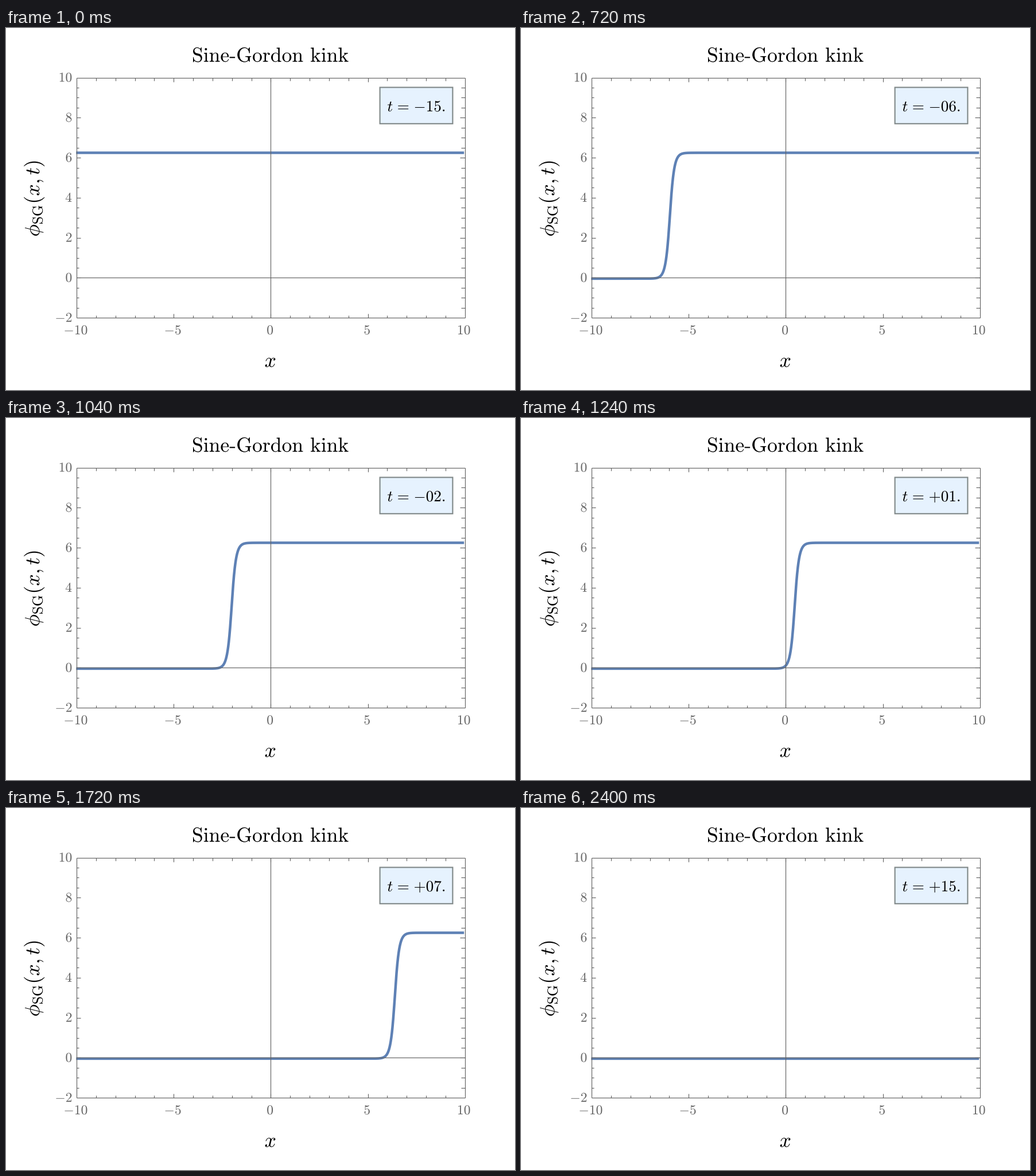
These frames come from a looping animation (887x631 px, 2.44 s). A matplotlib script:

```python
import math

import matplotlib.pyplot as plt
import numpy as np
from matplotlib.animation import FuncAnimation
from matplotlib.collections import LineCollection
from matplotlib.patches import PathPatch, Rectangle
from matplotlib.textpath import TextPath
from matplotlib.transforms import Affine2D

plt.rcParams["mathtext.fontset"] = "cm"

W, H, DPI = 887, 631, 64
PT = 72 / DPI  # points per pixel
STEPS, INTERVAL = 61, 40
SPEED = 0.99
GAMMA = 1 / math.sqrt(1 - SPEED**2)

GREY = "#666666"
BLUE = "#5e81b5"

fig = plt.figure(figsize=(W / DPI, H / DPI), dpi=DPI, facecolor="white")
ax = fig.add_axes([0, 0, 1, 1])
ax.set_xlim(0, W)
ax.set_ylim(H, 0)
ax.axis("off")


def grid_x(v):
    return 461.4 + 33.82 * v


def grid_y(v):
    return 435.4 - 34.89 * v


def text_path(s, size, x, y, anchor=None, angle=0):
    """Outline of math text; x is the pen origin, or an edge of the ink."""
    path = TextPath((0, 0), f"${s}$", size=size)
    if anchor:
        box = path.get_extents()
        shift = {"left": box.x0, "center": (box.x0 + box.x1) / 2, "right": box.x1}
        path = Affine2D().translate(-shift[anchor], 0).transform_path(path)
    place = Affine2D().rotate_deg(angle).scale(1, -1).translate(x, y)
    return place.transform_path(path)


def put(s, size, x, y, anchor=None, angle=0, color="black"):
    path = text_path(s, size, x, y, anchor, angle)
    patch = PathPatch(path, facecolor=color, linewidth=0, snap=False, zorder=5)
    return ax.add_patch(patch)


def draw_frame():
    left, right = grid_x(-10), grid_x(10)
    top, bottom = grid_y(10), grid_y(-2)
    lines = [
        [(left, top), (right, top)],
        [(left, bottom), (right, bottom)],
        [(left, top), (left, bottom)],
        [(right, top), (right, bottom)],
        [(grid_x(0), top), (grid_x(0), bottom)],
        [(left, grid_y(0)), (right, grid_y(0))],
    ]
    for v in range(-9, 10):
        x, major = grid_x(v), v % 5 == 0
        lines.append([(x, top), (x, 94 if major else 91.5)])
        lines.append([(x, bottom), (x, 497.5 if major else 501)])
    for k in range(-3, 20):
        y, major = grid_y(k / 2), k % 4 == 0
        lines.append([(left, y), (130 if major else 127, y)])
        lines.append([(790.5 if major else 793, y), (right, y)])
    ax.add_collection(
        LineCollection(lines, colors=GREY, linewidths=1.2 * PT, zorder=3)
    )


def draw_labels():
    tick = 23.6
    for v in range(-10, 11, 5):
        put(str(v), tick, grid_x(v) - 1.3, 534, "center", color=GREY)
    for v in range(-2, 11, 2):
        put(str(v), tick, 114.3, grid_y(v) + 7.1, "right", color=GREY)

    # title words at their offsets in em, with a drawn hyphen
    em, x, y = 35.6, 324, 59
    for word, offset in (("Sine", 0), ("Gordon", 2.167), ("kink", 5.789)):
        put(rf"\mathrm{{{word}}}", em, x + offset * em, y)
    ax.add_patch(
        Rectangle((x + 1.845 * em, y - 0.245 * em), 0.265 * em, 0.058 * em,
                  facecolor="black", linewidth=0, snap=False)
    )

    put("x", 36, 460.5, 591, "center")

    em, x, y = 36, 58.2, 363.8
    parts = ((r"\phi", 0), ("(", 1.585), ("x", 1.974), (",", 2.546),
             ("t", 2.991), (")", 3.352))
    for s, offset in parts:
        put(s, em, x, y - offset * em, angle=90)
    put(r"\mathrm{SG}", 0.7 * em, x + 0.155 * em, y - 0.596 * em, angle=90)


def clock_path(t):
    n = math.floor(abs(t) + 0.5)
    sign = "-" if t < 0 else "+"
    em, x, y = 27.2, 664.4, 145.3
    sign_path = text_path(sign, em, x + 1.695 * em, y)
    digits = text_path(rf"\mathrm{{{n:02d}.}}", em, x + 2.473 * em, y)
    return sign_path.make_compound_path(sign_path, digits)


def kink(x, t):
    return 4 * np.arctan(np.exp(GAMMA * (x - SPEED * t)))


draw_frame()
draw_labels()

# time box
ax.add_patch(
    Rectangle((651.6, 103.5), 126.8, 63.3, facecolor="#e6f2fe",
              edgecolor="#808888", linewidth=2.1 * PT, snap=False, zorder=4)
)
put("t", 27.2, 664.4, 145.3)
put("=", 27.2, 683.2, 145.3, "left")
clock = ax.add_patch(
    PathPatch(clock_path(-15), facecolor="black", linewidth=0, snap=False, zorder=5)
)

xs = np.linspace(-10, 10, 2001)
(curve,) = ax.plot([], [], color=BLUE, linewidth=4.5 * PT, snap=False, zorder=2,
                   solid_capstyle="butt", solid_joinstyle="round")


def update(i):
    t = -15 + i / 2
    curve.set_data(460.2 + 33.8 * xs, 436.9 - 34.92 * kink(xs, t))
    clock.set_path(clock_path(t))
    return curve, clock


anim = FuncAnimation(fig, update, frames=STEPS, interval=INTERVAL,
                     repeat=True, repeat_delay=0, blit=False)
plt.show()
```
